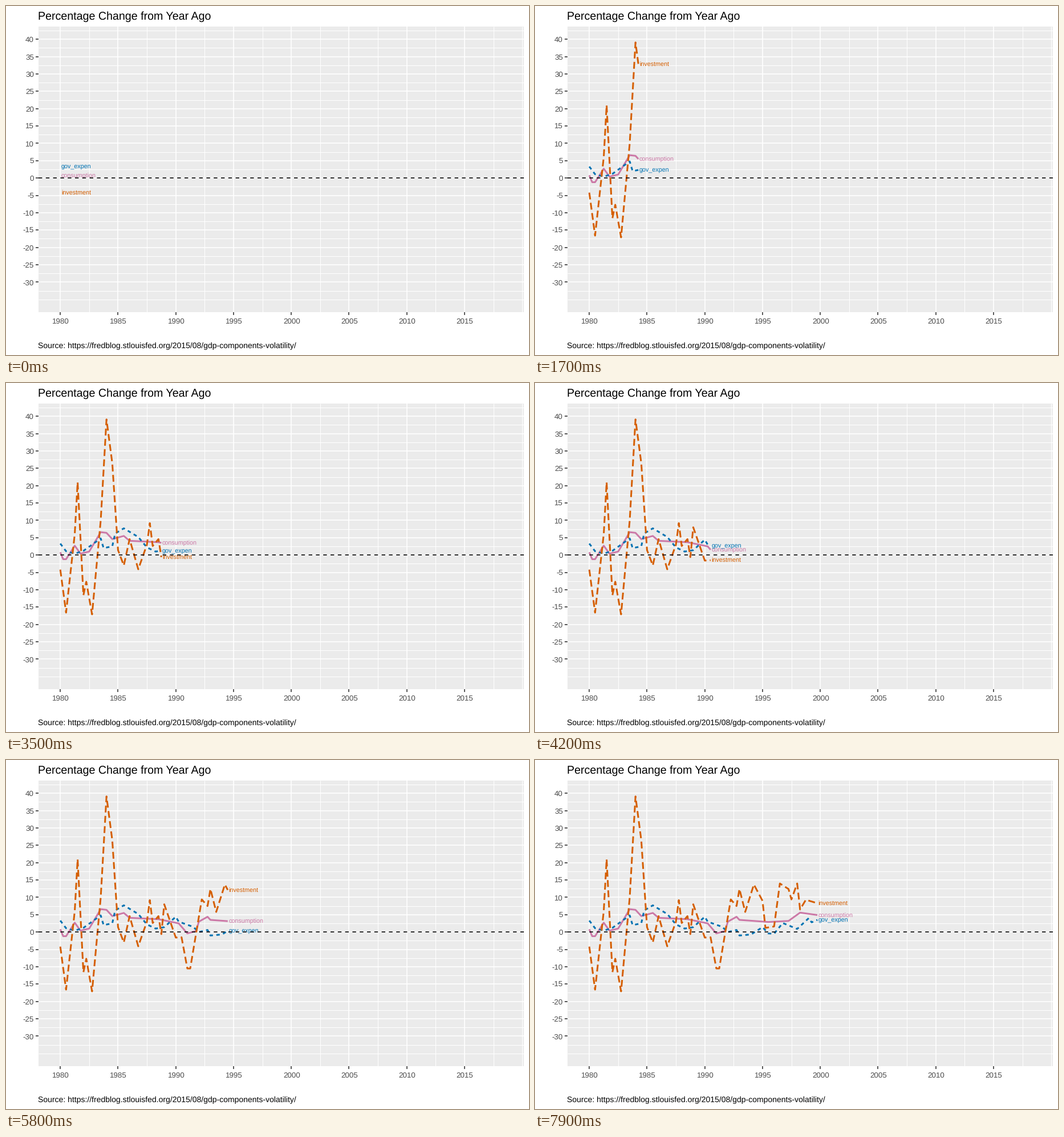
Write a matplotlib script that moves like this. It is 917 px wide and 611 px high and loops after 8000 ms.

```python
import matplotlib.pyplot as plt
import numpy as np
from matplotlib.animation import FuncAnimation
from matplotlib.patches import Rectangle

W, H, DPI = 917, 611, 64
FRAMES, INTERVAL = 80, 100
LEFT, RIGHT, TOP, BOTTOM = 56.5, 908, 35.5, 536
PT = 72 / DPI  # points per pixel
MAJOR, MINOR, THICK = 1.6, 1, 3

plt.rcParams["font.family"] = ["Liberation Sans", "DejaVu Sans"]
plt.rcParams["text.hinting"] = "none"  # keep natural letter spacing

# Turning points, {quarters since 1980: percent}; straight lines between
CONSUMPTION = {
    0: 0.8, 1: -1.2, 2: -1.2, 5: 2.7, 7: 0.4, 10: 1, 14: 6.6, 16: 6.4,
    18: 4.6, 22: 5.5, 24: 4.1, 34: 3.7, 41: 2.5, 44: -0.4, 47: 0.3,
    48: 3, 51: 4.4, 52: 3.5, 62: 2.9, 69: 3.2, 73: 5.6, 79: 4.9,
}
GOV_EXPEN = {
    0: 3.3, 2: 1.1, 5: 0.4, 8: 1.2, 14: 4.8, 15: 2, 18: 2.5, 19: 6.2,
    22: 7.7, 27: 5.2, 30: 2.2, 33: 1, 36: 1.4, 40: 4.4, 41: 3, 46: 1.5,
    48: 0, 51: 0.6, 52: -1, 56: -0.7, 60: 1.4, 62: -0.4, 64: -0.5,
    67: 2.6, 72: 0.9, 76: 4, 77: 2.8, 79: 3.5,
}
INVESTMENT = {
    0: -4.2, 2: -16.6, 5: 6, 6: 21, 8: -11.6, 9: -7.7, 11: -17.1,
    14: 10, 16: 39.1, 18: 26.5, 20: 1.4, 22: -3, 24: 4.6, 27: -4.1,
    30: 3, 31: 9.2, 32: 2.6, 34: 4.6, 35: -0.6, 36: 8, 40: -1.6,
    42: -1.5, 44: -10.5, 45: -10.5, 49: 9.4, 51: 7.5, 52: 12.4, 54: 5.8,
    57: 13.7, 60: 9, 61: 1.2, 64: 1.6, 66: 14, 69: 12.4, 70: 9.4,
    72: 14, 73: 6.5, 75: 9.3, 79: 8.3,
}


def px(year):
    return 95.2 + 20.25 * (year - 1980)


def py(value):
    return 301.2 - 6.074 * value


fig = plt.figure(figsize=(W / DPI, H / DPI), dpi=DPI, facecolor="white")
ax = fig.add_axes([0, 0, 1, 1])
ax.set_xlim(0, W)
ax.set_ylim(H, 0)
ax.axis("off")


def stroke(x, y, width, color, **kw):
    return ax.plot(x, y, lw=width * PT, color=color, solid_capstyle="butt",
                   dash_capstyle="butt", **kw)[0]


def write(x, y, text, size, color="black", **kw):
    return ax.text(x, y, text, fontsize=size * PT, color=color,
                   va="baseline", **kw)


def grid_x(year, width):
    stroke([px(year)] * 2, [TOP, BOTTOM], width, "white", zorder=width)


def grid_y(value, width):
    stroke([LEFT, RIGHT], [py(value)] * 2, width, "white", zorder=width)


def draw_panel():
    ax.add_patch(Rectangle((LEFT, TOP), RIGHT - LEFT, BOTTOM - TOP,
                           fc="#EBEBEB", ec="none", zorder=0))
    for year in np.append(np.arange(1982.5, 2018, 5), 2020):
        grid_x(year, MINOR)
    for value in np.append(np.arange(-32.5, 43, 5), -35):
        grid_y(value, MINOR)

    for year in range(1980, 2016, 5):
        x = px(year)
        grid_x(year, MAJOR)
        stroke([x, x], [BOTTOM, BOTTOM + 4.5], MAJOR, "#333333", zorder=2)
        write(x + 0.7, 555.5, str(year), 13.4, "#4D4D4D", ha="center")
    for value in range(-30, 41, 5):
        y = py(value)
        grid_y(value, MAJOR)
        stroke([LEFT - 4.5, LEFT], [y, y], MAJOR, "#333333", zorder=2)
        write(49, y + 5, str(value), 13.4, "#4D4D4D", ha="right")

    stroke([LEFT, RIGHT], [py(0)] * 2, MAJOR, "black", zorder=6,
           linestyle=(0, (4, 4)))
    write(56.3, 24, "Percentage Change from Year Ago", 19.6)
    write(56.3, 599.5, "Source: https://fredblog.stlouisfed.org/2015/08/"
          "gdp-components-volatility/", 13.97)


class Series:
    def __init__(self, name, turns, color, style):
        quarters = np.arange(FRAMES)
        self.x = px(1980 + quarters / 4)
        self.y = py(np.interp(quarters, list(turns), list(turns.values())))
        self.line = stroke([], [], THICK, color, linestyle=style, zorder=4,
                           solid_joinstyle="round", dash_joinstyle="round")
        self.label = write(0, 0, name, 10.8, color, zorder=5)

    def reveal(self, i):
        n = i + 1 if i else 0
        self.line.set_data(self.x[:n], self.y[:n])
        self.label.set_position((self.x[i] + 1.6, self.y[i] + 4))
        return [self.line, self.label]


draw_panel()
series = [
    Series("consumption", CONSUMPTION, "#CC79A7", "-"),
    Series("gov_expen", GOV_EXPEN, "#0072B2", (0, (2, 2))),
    Series("investment", INVESTMENT, "#D55E00", (0, (4, 2))),
]


def update(i):
    return [artist for s in series for artist in s.reveal(i)]


anim = FuncAnimation(fig, update, frames=FRAMES, interval=INTERVAL,
                     init_func=lambda: update(0), repeat=True,
                     repeat_delay=0, blit=False)
plt.show()
```
